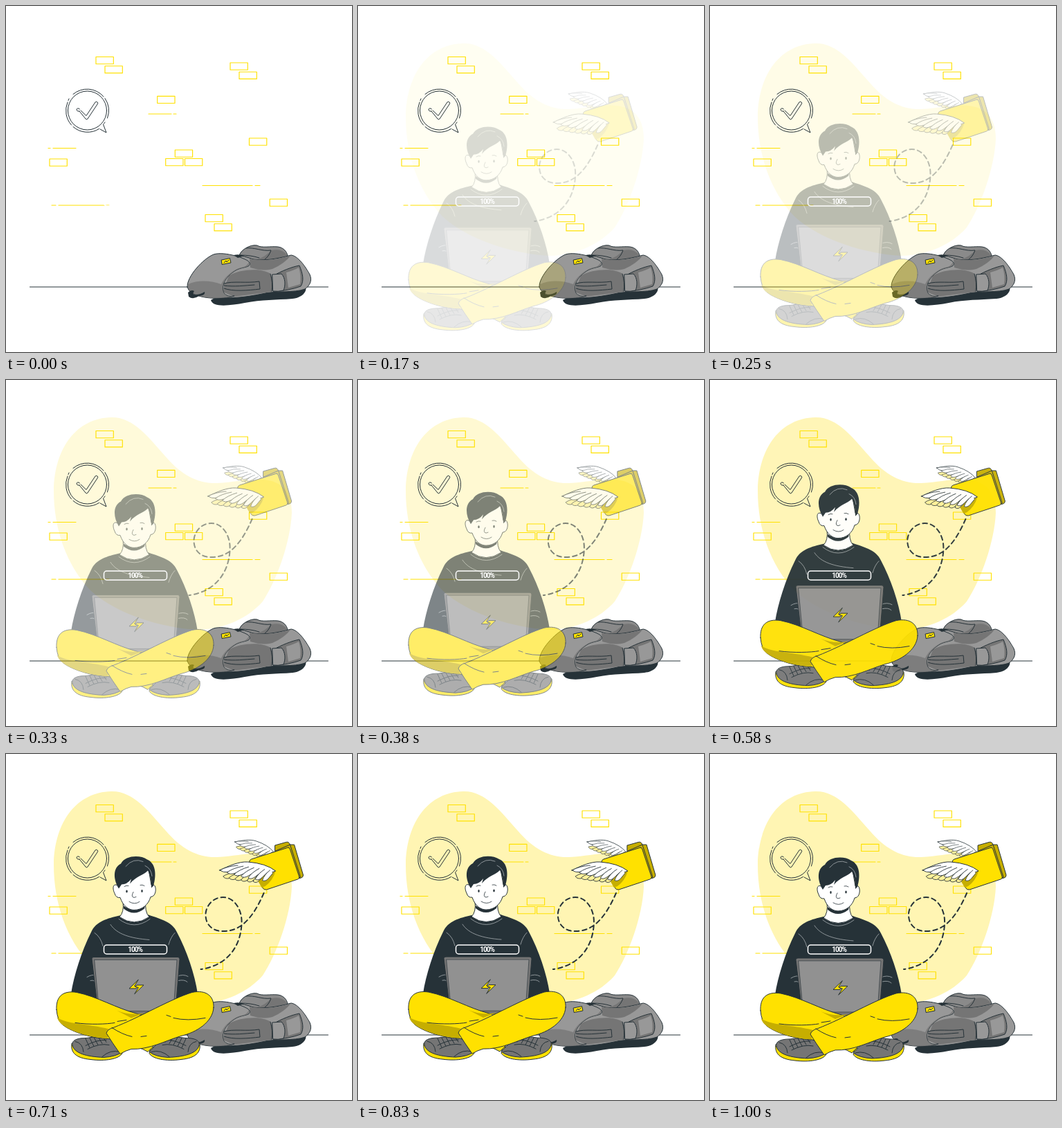
An HTML page for the animation above (1040 ms loop, 500 by 500 pixels).

```html
<!DOCTYPE html>
<html lang="en">
<head>
<meta charset="utf-8">
<title>Upload complete</title>
<style>
html, body { margin: 0; width: 100%; height: 100%; overflow: hidden; background: #fff; }
svg { display: block; width: 100%; height: 100%; }
path, rect, circle, ellipse { stroke-linecap: round; stroke-linejoin: round; }
.ink { fill: none; stroke: #263238; stroke-width: 1; }
.edge { stroke: #263238; stroke-width: 1; }
.chalk { fill: none; stroke: #b9bfc2; stroke-width: .7; }
.yellow { fill: #ffe100; }
.olive { fill: #c6ae00; }
.dark { fill: #263238; }
.white { fill: #fff; }
.light { fill: #989898; }
.mid { fill: #8a8a8a; }
.deep { fill: #757575; }
.wall { fill: none; stroke: #ffe100; stroke-width: 1.15; }
.label { font: 700 10px Roboto, "Liberation Sans", sans-serif; letter-spacing: -1px; fill: #fff; text-anchor: middle; }
</style>
</head>
<body>
<svg viewBox="0 0 500 500">
  <defs>
    <path id="brick" d="M0 0h25.300v10.200h-25.300z"/>
    <g id="pair"><use href="#brick"/><use href="#brick" x="13" y="13.200"/></g>
  </defs>

  <path id="blob" fill="#fff5b3" d="M152 54C184 53 207 84 231 111C254 138 278 150 305 149C332 148 349 142 372 144C399 146 413 162 413 192C411 234 392 288 371 320C350 344 316 360 276 361C226 358 160 339 122 304C87 267 69 215 69 160C70 97 103 55 152 54Z"/>

  <g class="wall">
    <use href="#pair" x="130" y="73.500"/>
    <use href="#pair" x="324" y="82"/>
    <use href="#pair" x="288" y="301.500"/>
    <use href="#brick" x="218.700" y="130.300"/>
    <use href="#brick" x="351.500" y="191"/>
    <use href="#brick" x="63" y="221"/>
    <use href="#brick" x="381.200" y="279"/>
    <use href="#brick" x="244.300" y="208"/>
    <use href="#brick" x="230.700" y="220.500"/>
    <use href="#brick" x="258.500" y="220.500"/>
    <path d="M61 205.500h3m4 0h33M206 156h33m3 0h4M284 259.500h72m4 0h7M66 288h6m4 0h67m2 0h4"/>
  </g>

  <g class="ink">
    <circle cx="117.500" cy="151" r="28"/>
    <path d="M97 127.500A31 31 0 0 1 141 131M143 133.500A31 31 0 0 1 146.500 162M143 168Q142 170 140.500 171L145 183L136 178M134.500 177.500A31 31 0 0 1 97 174.500M94.500 172A31 31 0 0 1 89 139M90 136.500L91 134"/>
    <path d="M106 152Q104 153 102.500 151Q101 149 103.500 148Q105 147.500 106.500 149M108 151L116 158.500L129 139Q130.500 137.500 132 139Q133.500 140 132 142L118 163Q116.500 165 115 163L106 152"/>
  </g>
  <path class="ink" d="M34.500 406H465.500"/>

  <g id="bag">
    <path class="dark" d="M296 425L320 412L430 405C437 405 434 421 414 423C390 425 370 424 345 429C323 433 299 436 296 425Z"/>
    <path class="mid edge" d="M337 361C338 353 353 344 363 346C369 350 382 347 393 348C401 349 406 355 407 361L385 372L350 368Z"/>
    <path class="deep" d="M363 366C376 362 378 357 384 353Q399 350 406 360L382 369Z"/>
    <path class="ink" d="M347 350C358 348 370 355 383 353Q380 362 373 367M338 360Q354 360 366 364"/>
    <path class="light edge" d="M329 361C340 359 350 364 358 366C380 369 399 363 412 360C422 361 433 377 439 388C443 397 439 404 432 409C417 415 388 411 370 416C346 421 318 424 303 420L320 380Z"/>
    <path class="deep" d="M352 365C380 370 398 364 411 361Q403 372 385 380C372 383 363 381 353 378ZM322 390C340 379 371 379 382 387Q387 397 384 413L330 420L313 413Z"/>
    <path class="light edge" d="M262 406C261 391 285 365 300 359C315 354 350 365 352 371C355 379 339 376 329 384C317 392 310 405 315 415Q320 421 330 419C312 424 282 424 268 414Q263 411 262 406Z"/>
    <path class="deep" d="M263 402C278 395 298 397 311 402C316 391 327 382 339 378Q348 377 351 370C355 379 339 376 329 384C317 392 310 405 315 415Q320 421 330 419C312 424 282 424 268 414Q262 410 263 402Z" opacity=".75"/>
    <path class="deep edge" d="M315 401C328 397 348 401 366 398L367 409C350 411 327 413 315 408"/>
    <path class="ink" d="M315 404C330 406 345 404 359 403M384 412Q386 400 382 387"/>
    <path class="deep edge" d="M386 390C398 383 413 377 424 375C429 387 431 397 426 405Q409 411 387 413Z"/>
    <path class="light" d="M405 385Q416 382 423 378Q427 390 425 402L408 407Z"/>
    <path class="light edge" d="M385 388L398 387C404 393 404 404 401 411Q393 413 386 412Z"/>
    <path class="dark" d="M329 360Q336 358 344 361L335 364ZM263 414Q268 409 272 412Q268 417 274 417Q281 417 287 413Q289 418 279 419Q270 425 264 420Z"/>
    <path class="yellow edge" d="M311.500 367L323.500 364.500L325 371L312.500 373.500Z"/>
    <path class="ink" d="M315 371L318 368L319 370L322 367"/>
  </g>

  <g id="mail">
    <path class="ink" style="stroke-width:2" stroke-dasharray="6.500 5" d="M373 201C362 226 345 257 314 256C296 256 288 244 289 230C291 215 303 207 314 207C330 207 341 224 341 242C341 272 325 305 282 311"/>
    <path class="olive edge" d="M389 140V132L405 127.500Q409 126 411 131L417 131L430 175Q430 178 427 179L390 187Z"/>
    <path class="olive edge" d="M390 140L411 131L426 178L400 187Z"/>
    <g id="farWing"></g>
    <path class="yellow edge" d="M352 156Q352 153 355 152L407 135.500Q410 134 411 138L424 177Q425 180 422 181L377 196Q373 197 371 193Z"/>
    <path class="olive" d="M362 179Q376 173 390 169Q386 183 375 191L370 193Z"/>
    <g id="nearWing"></g>
  </g>

  <g id="man">
    <path class="dark" d="M164 233C147 237 130 241 123 257C109 285 98 320 94 346L130 372H248L277 346C273 318 261 283 247 257C240 241 220 237 203 231Z"/>
    <path class="white edge" d="M169 213Q171 228 164 235Q185 250 207 235Q200 228 202 210Z"/>
    <path class="dark" d="M170 219Q185 229 201 219L200 223Q185 235 170 223Z"/>
    <path class="chalk" d="M163 238Q185 255 208 238M151 246C160 260 180 266 207 268M244 258Q238 264 235 275M128 258Q137 264 140 277M117 322Q125 317 131 320M122 327Q129 325 132 333M247 321Q256 317 263 321M249 327Q258 325 262 329"/>
    <path class="white edge" d="M162 190C155 185 153 193 157 201Q159 208 165 207C169 219 177 225 185 225C197 225 206 217 209 206C215 206 217 198 216 193Q215 187 210 189L206 166L170 166Z"/>
    <path class="dark" d="M163 194C155 181 154 164 166 158C172 146 194 145 204 152C216 157 218 173 213 190L210 193C210 182 208 174 205 168C198 175 188 176 179 187L181 180Q175 188 167 188Z"/>
    <path class="chalk" d="M173 162Q184 149 198 155M201 161Q210 165 211 176"/>
    <ellipse class="dark" cx="174.500" cy="198" rx="1.200" ry="2"/>
    <ellipse class="dark" cx="196.500" cy="197.500" rx="1.200" ry="2"/>
    <path class="ink" style="stroke-width:.8" d="M171 191Q174 189 177 190M194 189Q197 188 200 190M184 199Q180 206 185 207L188 206M178 213Q186 218 193 213"/>

    <path class="deep edge" d="M124 295Q124 293 127 293H248Q251 293 251 296L245 371Q245 376 241 376H138Q133 376 133 371Z"/>
    <path fill="#919191" class="edge" style="stroke-width:.6" d="M128 297H247L242 371H135Z"/>
    <path id="hook" class="yellow edge" d="M191 326L178 338.500H188L190 336L186 335Z"/>
    <use href="#hook" transform="rotate(180 188.500 336)"/>

    <g id="shoe">
      <path class="yellow edge" d="M95 418C93 431 101 439 122 441C144 444 164 440 168 432L166 424Z"/>
      <path class="deep edge" d="M96 421C94 413 103 410 116 410L145 406L168 430Q159 437 141 438C116 437 99 432 96 421Z"/>
      <path class="ink" d="M100 415Q111 417 112 430M115 421Q132 412 145 413M118 426Q135 417 149 420M139 437Q151 426 165 430"/>
      <path class="ink laces"/>
    </g>
    <use href="#shoe" transform="matrix(-1 0 0 1 375 0)"/>

    <path class="yellow edge" d="M73 369C72 350 82 341 102 344C132 350 159 367 190 375L238 398Q224 409 211 424L205 430Q190 421 178 423L148 411C127 411 96 402 82 391Q74 384 73 369Z"/>
    <path class="olive" d="M74 380C86 390 118 389 149 397L147 410C126 410 96 402 82 391Q75 386 74 380ZM160 370Q178 378 200 374L181 381Z"/>
    <path class="yellow edge" d="M300 366C301 349 289 340 269 344C239 353 194 380 155 395Q147 397 145 403Q153 416 165 433Q173 428 181 426C207 427 230 414 253 407C275 402 299 387 300 366Z"/>
    <path class="ink" d="M100 388C121 391 146 390 157 388M161 386L174 384M153 395Q168 405 182 408M195 408L203 407M232 377L238 379M242 381Q262 386 288 381"/>
  </g>

  <rect x="141.500" y="276" width="91" height="13" rx="4" fill="none" stroke="#fff" stroke-width="1.500"/>
  <text class="label" x="186.500" y="286.300">100%</text>
</svg>
<script>
const LOOP = 1040, START = 80, LEAD = 45, DURATION = 1000;
const TRAVEL = 30, PEAK = 1.064;
const byId = id => document.getElementById(id);
const mix = (a, b, k) => a + (b - a) * k;

// Overlapping feathers, laid from the wing tip towards the root.
function feathers(count, x0, y0, x1, y1, length, turn, color) {
  let out = '';
  for (let i = 0; i < count; i++) {
    const k = i / (count - 1), len = length * (1 - .3 * k);
    out += `<path fill="${color}" stroke="#263238" stroke-width=".8"
      transform="translate(${mix(x0, x1, k)} ${mix(y0, y1, k)}) rotate(${-8 - turn * k})"
      d="M0 -3Q${-len * .6} -4 ${-len} 0Q${-len * .9} 5 ${-len * .5} 4L0 3"/>`;
  }
  return out;
}

// Draws a wing whose tip is at (x, y); size 1 is the near one.
function wing(x, y, size) {
  return `<g transform="translate(${x} ${y}) scale(${size})">` +
    feathers(6, 25, 6, 60, 8, 20, 28, '#fff19a') +
    '<path class="white edge" d="M0 0C13 -6 28 -13 41 -12Q67 -10 81 1Q63 10 41 5Q17 6 0 0Z"/>' +
    feathers(7, 27, -4, 75, 2, 26, 36, '#fff') + '</g>';
}

byId('nearWing').innerHTML = wing(309, 168, 1);
byId('farWing').innerHTML = `<g transform="rotate(14 331 127)">${wing(331, 127, .72)}</g>`;

let laces = '';
for (let i = 0; i < 5; i++) laces += `M${115 + i * 6} ${411 - i}l6 ${13 - i}`;
document.querySelector('.laces').setAttribute('d', laces);

// Cubic Bezier easing with a soft overshoot; x rises steadily, so bisect for it.
function ease(x) {
  const curve = (a, b, s) => 3 * a * s * (1 - s) ** 2 + 3 * b * s * s * (1 - s) + s ** 3;
  let low = 0, high = 1;
  for (let i = 0; i < 24; i++) {
    const s = (low + high) / 2;
    if (curve(.36, .5, s) < x) low = s; else high = s;
  }
  return curve(-.01, 1.38, low);
}

const blob = byId('blob'), man = byId('man'), mail = byId('mail');

function draw(t) {
  const p = t < START ? 0 : ease(Math.min(1, (t + LEAD) / DURATION));
  const shift = TRAVEL * (PEAK - p);
  for (const part of [blob, man, mail]) part.setAttribute('opacity', Math.min(1, p));
  man.setAttribute('transform', `translate(0 ${shift})`);
  mail.setAttribute('transform', `translate(${-shift} 0)`);
}

const begin = performance.now();
function tick() {
  draw((performance.now() - begin) % LOOP);
  requestAnimationFrame(tick);
}
draw(0);
requestAnimationFrame(tick);
</script>
</body>
</html>
```
